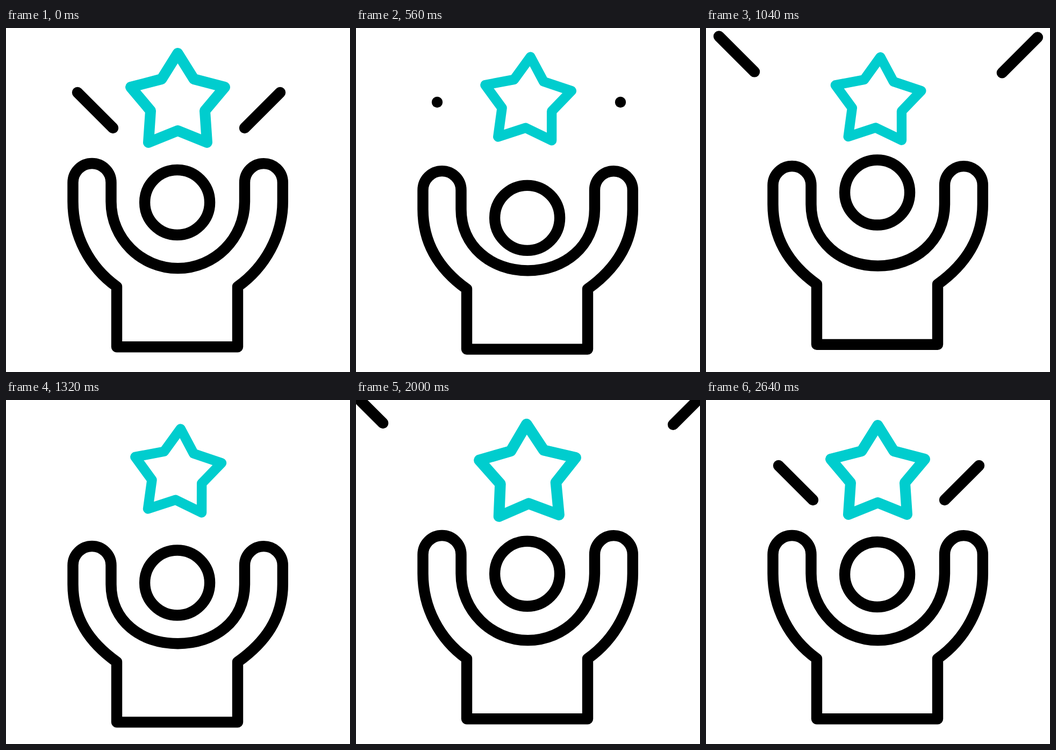
An HTML page that plays this animation: 640 by 640 pixels, repeating every 2680 ms.

```html
<!DOCTYPE html>
<html lang="en">
<head>
<meta charset="utf-8">
<title>Cheer</title>
<style>
  html, body { margin: 0; height: 100%; overflow: hidden; background: #fff; }
  svg { display: block; width: 100vw; height: 100vh; }
</style>
</head>
<body>
<svg viewBox="0 0 640 640" fill="none" stroke="#000" stroke-width="20.4" stroke-linecap="round" stroke-linejoin="round">
  <path id="body"/>
  <circle id="head" cx="318.6" r="60.5"/>
  <path id="left"/>
  <path id="right"/>
  <path id="star" stroke="#00cdce" stroke-width="20"
    d="M319.5 47L349.5 95 407 110 370 154 374 213 319.5 191 265 213 269 154 232 110 289.5 95Z"/>
</svg>
<script>
const LOOP = 2680, STEP = 40, RAY_CYCLE = 880;
const $ = id => document.getElementById(id);
const beats = [0, 400, 800, 1200, 1600, 2000];
const starTimes = [0, 360, 760, 1320, 1640, 2000, 2280, 2640];

// Eased value at time t between keyed values
function track(t, times, values) {
  const last = times.length - 1;
  if (t <= times[0]) return values[0];
  if (t >= times[last]) return values[last];
  const i = times.findIndex(k => k > t);
  const p = (t - times[i - 1]) / (times[i] - times[i - 1]);
  return values[i - 1] + (values[i] - values[i - 1]) * p * p * (3 - 2 * p);
}

// Arms and torso move apart while the curve handles keep their length
function bodyPath(arm, torso) {
  const tip = 287.5 + arm, elbow = 323 + arm;
  const chest = 447.1 + torso, shoulder = 481.3 + torso, base = 593.3 + torso;
  return `M206 ${shoulder}C154.8 ${shoulder - 36.6} 124.5 ${elbow + 62.9} 124.5 ${elbow}
    V${tip}A35 35 0 0 1 195.5 ${tip}V${elbow}
    C195.5 ${elbow + 68.5} 251.2 ${chest} 319.7 ${chest}S444 ${elbow + 68.5} 444 ${elbow}
    V${tip}A35 35 0 0 1 514.8 ${tip}V${elbow}
    C514.8 ${elbow + 62.9} 482.2 ${shoulder - 36.6} 431 ${shoulder}V${base}H206Z`;
}

// Rays fly off to the corner, then grow back in place
function rayPath(phase, distance) {
  if (phase < 530) {
    const d = distance * (1 - (1 - phase / 530) ** 2);
    return `M${133 - d} ${120 - d * .96}L${199 - d} ${186 - d * .96}`;
  }
  if (phase < 560) return "";
  const far = 133 + (920 - phase) * .05;
  const near = Math.min(199, 151 + (phase - 560) * .165);
  return `M${far} ${far - 13}L${near} ${near - 13}`;
}

function draw(t) {
  const arm = track(t, beats, [0, 49.4, -50.8, 35.4, -36, 0]);
  const torso = track(t, beats, [0, 28, -39.4, 14.5, -24.5, 0]);
  $("body").setAttribute("d", bodyPath(arm, torso));
  $("head").setAttribute("cy", 324.5 + track(t - 50, beats, [0, 47, -51, 19.4, -28.5, 0]));

  const phase = t - RAY_CYCLE * Math.min(2, Math.floor(t / RAY_CYCLE));
  $("left").setAttribute("d", rayPath(phase, 212.5));
  $("right").setAttribute("d", rayPath(phase, 208.5));

  const scale = track(t, starTimes, [1, .93, .907, .92, .959, 1.025, 1.045, 1]);
  const turn = track(t, starTimes, [0, 4.2, 3.6, 4, -2, -1.5, -1.5, 0]);
  $("star").setAttribute("transform",
    `translate(319.5 128) rotate(${turn}) scale(${scale}) translate(-319.5 -128)`);
}

function frame() {
  draw(Math.floor(performance.now() % LOOP / STEP) * STEP);
  requestAnimationFrame(frame);
}

$("right").setAttribute("transform", "matrix(-1 0 0 1 643 0)");
frame();
</script>
</body>
</html>
```
